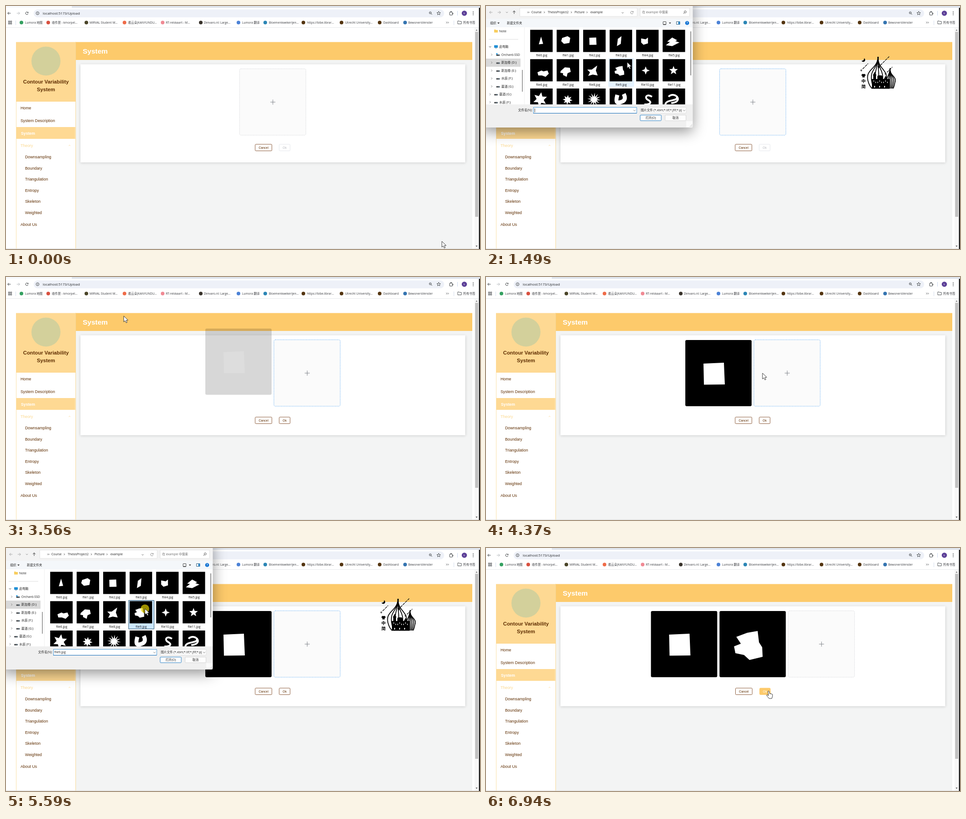
Write an HTML page with a canvas that moves like this. It is 1044 by 536 pixels and loops after 8000 ms.

```html
<!DOCTYPE html>
<html lang="en">
<head>
<meta charset="utf-8">
<title>Upload</title>
<style>
html, body { margin: 0; width: 100%; height: 100%; overflow: hidden; background: #fff; }
canvas { display: block; width: 1044px; height: 536px; }
</style>
</head>
<body>
<canvas id="stage" width="1044" height="536"></canvas>
<script>
const g = document.getElementById('stage').getContext('2d');
const LOOP = 8000;
const UI = '"Open Sans", "Noto Sans CJK SC", "Noto Sans CJK", sans-serif';
const PAGE = '"Liberation Sans", Arial, sans-serif';
const BROWN = '#5e2d00', GOLD = '#fdca6b', PALE = '#fed993', BLUE = '#409eff';

// Dialog visible spans, and when each picked picture lands on the page
const OPEN = [[940, 3380], [4640, 5800]];
const ADD = [3430, 5870];
const PICK = [[2250, 2], [5420, 9]];
const CLICKS = [[740, 830], [2250, 2350], [3220, 3300], [4430, 4520], [5540, 5640]];
const PATH = [
  [70, 960, 519], [660, 600, 225], [900, 596, 222], [1490, 311, 124], [1660, 309, 122],
  [2200, 251, 83], [3480, 251, 83], [4370, 609, 212], [4540, 606, 216], [4700, 540, 228],
  [5350, 306, 134], [5660, 306, 134], [5920, 325, 157], [6000, 372, 200], [6180, 540, 330],
  [6300, 610, 364], [6470, 640, 314], [6670, 640, 314], [6800, 620, 316]
];

const clamp = v => Math.max(0, Math.min(1, v));
const within = (t, [a, b]) => t >= a && t < b;

// cubic-bezier(.55, 0, .1, 1)
function glide(p) {
  p = clamp(p);
  let lo = 0, hi = 1;
  for (let i = 0; i < 18; i++) {
    const s = (lo + hi) / 2, r = 1 - s;
    if (1.65 * s * r * r + 0.3 * s * s * r + s * s * s < p) lo = s; else hi = s;
  }
  return 3 * lo * lo * (1 - lo) + lo * lo * lo;
}

function cursorAt(t) {
  let a = PATH[0];
  for (const b of PATH) {
    if (t < b[0]) {
      const p = clamp((t - a[0]) / (b[0] - a[0] || 1)), e = p * p * (3 - 2 * p);
      return [a[1] + (b[1] - a[1]) * e, a[2] + (b[2] - a[2]) * e];
    }
    a = b;
  }
  return [a[1], a[2]];
}

function rect(x, y, w, h, fill, stroke, r = 0, lw = 1) {
  g.beginPath();
  g.roundRect(x, y, w, h, r);
  if (fill) { g.fillStyle = fill; g.fill(); }
  if (stroke) { g.strokeStyle = stroke; g.lineWidth = lw; g.stroke(); }
}
function disc(x, y, r, fill, stroke, lw = 1) {
  g.beginPath();
  g.arc(x, y, r, 0, 7);
  if (fill) { g.fillStyle = fill; g.fill(); }
  if (stroke) { g.strokeStyle = stroke; g.lineWidth = lw; g.stroke(); }
}
function trace(pts, x = 0, y = 0, k = 1) {
  g.beginPath();
  for (let i = 0; i < pts.length; i += 2) g.lineTo(x + pts[i] * k, y + pts[i + 1] * k);
}
function line(pts, color, lw = 1) {
  trace(pts);
  g.strokeStyle = color; g.lineWidth = lw; g.stroke();
}
function poly(pts, fill, x, y, k) {
  trace(pts, x, y, k);
  g.closePath(); g.fillStyle = fill; g.fill();
}
// y is the middle of the capitals
function text(s, x, y, size, color, { font = UI, weight = 400, align = 'left' } = {}) {
  g.font = `${weight} ${size}px ${font}`;
  g.textAlign = align;
  g.fillStyle = color;
  g.fillText(s, x, y + size * 0.36);
}
function clipped(x, y, w, h, draw) {
  g.save();
  g.beginPath(); g.rect(x, y, w, h); g.clip();
  draw();
  g.restore();
}
function chevron(x, y, dir, color, s = 2.2) {
  const p = { down: [-s, -s / 2, 0, s / 2, s, -s / 2], up: [-s, s / 2, 0, -s / 2, s, s / 2], right: [-s / 2, -s, s / 2, 0, -s / 2, s] }[dir];
  line(p.map((v, i) => v + (i % 2 ? y : x)), color, 0.9);
}
function arrow(x, y, angle, color) {
  g.save();
  g.translate(x, y); g.rotate(angle);
  line([-3.3, 0, 3.3, 0], color, 1);
  line([0.3, -3, 3.3, 0, 0.3, 3], color, 1);
  g.restore();
}
function reload(x, y, color) {
  g.beginPath(); g.arc(x, y, 2.9, 0.4, 5.5);
  g.strokeStyle = color; g.lineWidth = 1; g.stroke();
  poly([3.3, -3.6, 3.3, -0.4, 0.4, -0.4], color, x, y);
}
function lens(x, y, flip, color) {
  disc(x, y, 2.3, null, color, 0.9);
  line([x + 1.7 * flip, y + 1.7, x + 4 * flip, y + 4], color, 1);
}
function star(x, y, n, r, inner, turn = 0) {
  const pts = [];
  for (let i = 0; i < n * 2; i++) {
    const a = turn - Math.PI / 2 + i * Math.PI / n, q = i % 2 ? inner : r;
    pts.push(x + Math.cos(a) * q, y + Math.sin(a) * q);
  }
  return pts;
}
function folder(x, y, fill, stroke) {
  trace([0, 0, 3, 0, 4, 1, 8, 1, 8, 6.5, 0, 6.5], x, y);
  g.closePath();
  if (fill) { g.fillStyle = fill; g.fill(); }
  if (stroke) { g.strokeStyle = stroke; g.lineWidth = 0.9; g.stroke(); }
}

const SQUARE = [40, 52, 85, 50, 87, 98, 41, 98.5];
const ROCK = [37, 57, 61, 48, 84, 44, 87, 69, 94, 80, 95, 101, 66, 108, 54, 97, 35, 93, 32, 78, 47, 72];
const SHAPES = [
  [24, 15, 19, 32, 28.5, 31],
  [12, 18, 24, 14, 30, 18, 28, 29, 16, 31, 10, 25],
  SQUARE.map(v => v / 2.96),
  [18, 20, 26, 14, 24.5, 31, 16, 36],
  [11, 19, 21, 21, 26, 17, 26, 30, 16, 33, 11, 28],
  [21, 17, 32, 23, 28, 25, 37, 28, 21, 36, 7, 34, 16, 27, 10, 26],
  [16, 29, 25, 25, 29, 27, 38, 25, 41, 32, 34, 39, 26, 36, 18, 36],
  [9, 26, 18, 18, 29, 19, 31, 28, 24, 31, 22, 39, 14, 35, 14, 31, 8, 30],
  [9, 23, 19, 23, 31, 14, 28, 25, 32, 36, 21, 34, 11, 37, 15, 29],
  ROCK.map(v => v / 2.96),
  star(21, 25, 4, 9, 3.6),
  star(24, 25, 5, 10, 4.3),
  star(22, 24, 6, 16, 8, 0.15),
  star(24, 25, 8, 11, 5.5, 0.1),
  star(24, 24, 12, 15, 6, 0.1)
];

function squiggle(kind, x, y) {
  g.save();
  g.translate(x, y);
  g.strokeStyle = '#fff'; g.lineWidth = kind ? 4 : 9;
  g.beginPath();
  if (kind === 0) { g.moveTo(17, 14); g.bezierCurveTo(12, 32, 17, 32, 24, 30); g.bezierCurveTo(33, 28, 36, 22, 31, 12); }
  if (kind === 1) { g.moveTo(35, 18); g.bezierCurveTo(22, 10, 18, 21, 26, 25); g.bezierCurveTo(36, 30, 31, 36, 18, 35); }
  if (kind === 2) { g.moveTo(13, 18); g.bezierCurveTo(20, 11, 34, 14, 31, 22); g.bezierCurveTo(27, 28, 4, 24, 6, 38); g.moveTo(31, 17); g.bezierCurveTo(38, 26, 30, 31, 19, 32); }
  g.stroke();
  g.restore();
}

function drawBrowser() {
  rect(0, 0, 1044, 4, '#dfe4ec');
  rect(0, 0, 145, 4, '#f8fafd');
  rect(61, 7.5, 904, 17.5, '#eef1f8', null, 9);
  const ink = '#3c4043';
  arrow(7, 16, Math.PI, ink);
  arrow(27, 16, 0, '#b5b8bc');
  reload(46, 16, ink);
  disc(69.5, 16, 3.3, null, ink, 0.9);
  line([69.5, 15.5, 69.5, 18], ink, 0.9);
  rect(69, 13.8, 1, 1, ink);
  text('localhost:5173/Upload', 81, 16, 7.8, '#26282b');
  lens(934.5, 15, 1, ink);
  line([933.3, 15, 935.7, 15], ink, 0.7);
  trace(star(953, 16, 5, 4.3, 1.9)); g.closePath();
  g.strokeStyle = ink; g.lineWidth = 0.9; g.stroke();
  rect(977, 13.5, 6.5, 6.5, null, ink, 1);
  disc(980.3, 12.6, 1.2, ink); disc(984, 16.7, 1.2, ink);
  line([994.5, 11, 994.5, 21], '#c9d6ee');
  disc(1009.5, 16, 5.8, '#5c3f97');
  text('k', 1009.5, 16, 5.5, '#fff', { align: 'center' });
  for (const d of [-3.3, 0, 3.3]) disc(1029, 16 + d, 0.9, ink);

  for (let i = 0; i < 4; i++) rect(5.5 + (i % 2) * 4.3, 33 + (i >> 1) * 4.3, 2.7, 2.7, null, ink, 0, 0.9);
  line([21.5, 32, 21.5, 42], '#d5deee');
  const marks = [
    [34, '#34a060', 'Lumora 地图', 42], [93, '#d8503f', '收件匣 - kmorpel...', 101],
    [177, '#4a4528', 'MIRVAL Student M...', 184], [261, '#ef6b48', '看云朵(KANYUNDU...', 269],
    [345, '#f08a94', 'RT-reiskaart - M...', 352], [429, '#38322b', 'Zenvaro.nl: Large...', 436],
    [512, '#4b82d6', 'Lumora 翻译', 520], [571, '#2b86b5', 'Bloemenkwekerijen...', 579],
    [655, '#54350f', 'https://bibe.librar...', 663], [739, '#54350f', 'Utrecht University...', 747],
    [823, '#54350f', 'Dashboard', 831], [879, '#3474b0', 'BewonersVenster', 886]
  ];
  for (const [x, c, s, tx] of marks) {
    disc(x, 36.5, 4, c);
    text(s, tx, 37, 6.6, '#3a3c40');
  }
  chevron(970.5, 36.5, 'right', ink, 1.8); chevron(973.8, 36.5, 'right', ink, 1.8);
  line([986.5, 32, 986.5, 42], '#d5deee');
  folder(995, 33, null, ink);
  text('所有书签', 1007, 37, 6.7, '#3a3c40');
  line([0, 47.5, 1041, 47.5], '#e6e8eb');

  rect(1032, 48, 9.5, 488, '#f7f7f7');
  rect(1033.3, 57, 6.7, 408, '#c1c1c1');
  poly([1034.5, 54.5, 1038.5, 54.5, 1036.5, 51.5], '#777', 0, 0);
  poly([1034.5, 528.5, 1038.5, 528.5, 1036.5, 531.5], '#555', 0, 0);
  rect(1041.7, 4, 2.3, 532, '#111');
}

function drawSidebar() {
  rect(22, 79.5, 132, 131.5, PALE);
  disc(88, 121.5, 32, '#d3d09b');
  const bold = { font: PAGE, weight: 700, align: 'center' };
  text('Contour Variability', 88, 167, 11.3, BROWN, bold);
  text('System', 88, 184, 11.3, BROWN, bold);
  line([22.5, 211, 22.5, 536], '#fbe0a8');
  line([153.5, 79, 153.5, 536], '#f6d795');
  rect(23, 267, 129.5, 26, PALE);
  const item = (s, x, y, c = BROWN) => text(s, x, y, 8.8, c, { font: PAGE });
  item('Home', 32, 225);
  item('System Description', 32, 252.5);
  text('System', 33, 280.5, 8.7, '#fff', { font: PAGE, weight: 700 });
  item('Theory', 32, 307.5, '#fbd88f');
  chevron(140, 307.5, 'up', '#fbd88f', 1.8);
  ['Downsampling', 'Boundary', 'Triangulation', 'Entropy', 'Skeleton', 'Weighted']
    .forEach((s, i) => item(s, 42, 333 + i * 24.5));
  item('About Us', 32, 482);
}

function picture(shape, x, y, alpha) {
  g.save();
  g.globalAlpha = alpha;
  rect(x, y, 146, 146, '#000', null, 3);
  poly(shape, '#fff', x, y);
  g.restore();
}

function button(s, x, y, w, color, edge, fill) {
  rect(x + 0.5, y + 0.5, w - 1, 14.5, fill, edge, 1.8, 0.9);
  text(s, x + w / 2, y + 7.8, 6.9, color, { font: PAGE, align: 'center' });
}

function drawPage(t) {
  rect(154, 119, 873, 417, '#f3f4f4');
  rect(154, 79.5, 873, 39.5, GOLD);
  text('System', 169, 99, 15.5, '#fff', { font: PAGE, weight: 700 });

  const count = ADD.filter(a => t >= a).length;
  g.save();
  g.shadowColor = 'rgba(0,0,0,.16)'; g.shadowBlur = 6; g.shadowOffsetY = 1;
  rect(164, 128.5, 847.5, count ? 220.5 : 216.5, '#fff');
  g.restore();

  const dx = 514 + count * 75.6;
  g.save();
  g.setLineDash([2, 1.4]);
  rect(dx + 0.5, 138.5, 146, 146.5, '#fbfbfb', within(t, [600, 6740]) ? '#62adf3' : '#d4d5d8', 3, 0.9);
  g.restore();
  line([dx + 68.3, 212, dx + 79.3, 212], '#70757c', 0.9);
  line([dx + 73.8, 206.5, dx + 73.8, 217.5], '#70757c', 0.9);

  if (count) {
    const p = glide((t - ADD[0]) / 500), q = glide((t - ADD[1]) / 500);
    picture(SQUARE, 439 - 75.7 * q, 139 - 30 * (1 - p), p);
    if (count > 1) picture(ROCK, 514.3, 139 - 30 * (1 - q), q);
  }

  const by = count ? 308.5 : 304.5, hot = t >= 6800, sx = hot ? 0.7 : 0;
  button('Cancel', 548.3 + sx, by, 37.8, BROWN, '#804a26', '#fff');
  if (hot) button('Ok', 601.5 + sx, by, 24.5, '#fff', GOLD, GOLD);
  else if (count) button('Ok', 601.2, by, 25, BROWN, '#804a26', '#fff');
  else button('Ok', 601.2, by, 25, '#b9bbc0', '#e3e5ea', '#fff');
  line([0, 535.5, 1041, 535.5], '#dcdcdc');
}

function drive(x, y) {
  rect(x, y - 0.5, 8, 3, '#4a4d50', null, 1);
  rect(x + 5.5, y + 0.5, 1.3, 1, '#7fd0ff');
}

function drawNav() {
  const ink = '#222';
  folder(18, 52, '#f8cd5c');
  text('Note', 29, 55.5, 7, ink);
  line([6, 73.5, 71, 73.5], '#dedede');
  chevron(9, 90, 'down', '#333');
  rect(18, 86.5, 8, 5.5, '#1f8fd6'); rect(20, 92.5, 4, 1, '#5c7a90');
  text('此电脑', 29, 90, 6.8, ink);
  rect(0, 116, 76, 18, '#d9d9d9');
  const drives = [[0, 'Orchard-SSD'], [0, '新加卷 (D:)'], [0, '新加卷 (E:)'], [0, '水辰 (F:)'], [0, '墓酒 (G:)'], [1, '墓酒 (G:)'], [1, '水辰 (F:)']];
  drives.forEach(([root, s], i) => {
    const y = 107.5 + i * 17.45, x = root ? 18 : 22.5;
    chevron(root ? 9 : 12.5, y, 'right', '#777');
    drive(x, y);
    if (!i) rect(x, y - 3.5, 3, 3, '#2b9be0');
    clipped(0, 98, 75, 119, () => text(s, x + 11.3, y, 6.9, ink));
  });
  rect(79.3, 141, 1.6, 48, '#8a8a8a');
}

function drawTiles(picked, [mx, my]) {
  for (let i = 0; i < 18; i++) {
    const x = 97.3 + (i % 6) * 58.35, y = 52.5 + Math.floor(i / 6) * 64.8;
    const over = mx > x - 3 && mx < x + 54 && my > y - 2 && my < y + 61;
    if (i === picked) rect(x - 2.3, y - 1.7, 56, 63, '#cce8ff', '#24506e', 0, 1);
    else if (over) rect(x - 3, y - 2, 57, 63, '#e5f3ff');
    rect(x, y, 49.5, 49, '#000');
    if (i < SHAPES.length) poly(SHAPES[i], '#fff', x, y);
    else squiggle(i - 15, x, y);
    text(`file${i}.jpg`, x + 25.3, y + 56, 6.7, '#111', { align: 'center' });
  }
}

function drawDialog(picked, mouse) {
  g.save();
  g.shadowColor = 'rgba(0,0,0,.42)'; g.shadowBlur = 30; g.shadowOffsetY = 9;
  rect(-8, -20, 463.5, 288, '#f0f0f0', null, 4);
  g.restore();
  rect(0, 0, 455, 28, '#f3f3f3');
  rect(0, 28, 455, 19, '#f4f7fa');
  rect(0, 47, 455, 170, '#fff');
  line([84.5, 47, 84.5, 217], '#f0f0f0');

  const ink = '#222';
  arrow(11, 14, Math.PI, '#a9a9a9');
  arrow(29, 14, 0, '#a9a9a9');
  chevron(46, 14, 'down', '#888');
  arrow(62, 14, -Math.PI / 2, '#333');
  rect(74.5, 4.5, 258.5, 18.5, '#fff', '#e2e2e2');
  chevron(92, 14, 'right', '#555', 1.5); chevron(94.5, 14, 'right', '#555', 1.5);
  for (const [s, x] of [['Course', 100], ['ThesisProject2', 136], ['Picture', 195], ['example', 230]]) text(s, x, 14, 6.8, ink);
  for (const x of [128.5, 188, 222.5]) chevron(x, 14, 'right', '#444', 1.8);
  chevron(301, 15, 'down', '#666');
  reload(321.5, 14.5, '#888');
  rect(339.5, 4.5, 109, 18.5, '#fff', '#e2e2e2');
  text('在 example 中搜索', 344, 14, 6.7, '#666');
  lens(438.8, 13, -1, '#444');

  text('组织', 9, 38, 6.8, ink);
  poly([25, 36.5, 30, 36.5, 27.5, 39.3], ink, 0, 0);
  text('新建文件夹', 46, 38, 6.7, ink);
  rect(390, 34.5, 6.5, 6, null, '#333', 0.5, 0.9);
  line([390, 41, 396.5, 41], '#333', 1.3);
  poly([403, 36.5, 407.5, 36.5, 405.2, 39.3], ink, 0, 0);
  rect(419.5, 34.5, 7.5, 6, '#fff', '#24506e', 0, 0.9);
  rect(423.5, 34.5, 3.5, 6, '#2b87c8');
  disc(443, 37.5, 4.3, '#0a6ed1');
  text('?', 443, 37.5, 6.3, '#fff', { align: 'center', weight: 700 });

  clipped(0, 47, 84, 170, drawNav);
  clipped(85, 47, 364, 170, () => drawTiles(picked, mouse));
  rect(450.3, 56, 1.6, 97, '#777');

  rect(441, 254, 14, 13.5, '#fafafa');
  for (let i = 0; i < 6; i++) rect(453 - [0, 2, 4, 0, 2, 0][i], 265 - [0, 0, 0, 2, 2, 4][i], 1, 1, '#b5b5b5');
  text('文件名(N):', 102, 230, 6.8, ink, { align: 'right' });
  rect(104.5, 223.5, 227.5, 13, '#fff', '#4a9bd8');
  line([104, 236.5, 332, 236.5], '#0a67b5');
  if (picked < 0) line([107.5, 226, 107.5, 234.5], '#111', 0.8);
  else text(`file${picked}.jpg`, 106.5, 230, 6.8, ink);
  chevron(327, 230.5, 'down', '#666');
  rect(339.5, 223.5, 101.5, 13, '#fbfbfb', '#e0e0e0');
  clipped(339, 223, 92, 14, () => text('图片文件 (*.xbm;*.tif;*.jfif;*.pjpeg)', 341, 230, 6.6, ink));
  chevron(436.5, 230.5, 'down', '#666');
  rect(339.5, 240.5, 46.5, 12.5, '#fdfdfd', '#2a80c4', 1.5);
  text('打开(O)', 362.7, 246.7, 6.7, ink, { align: 'center' });
  rect(394.5, 240.5, 46, 12.5, '#fdfdfd', '#d5d5d5', 1.5);
  text('取消', 417.5, 246.7, 6.7, ink, { align: 'center' });
}

// Onion dome built from a fan of ribs
function dome(x, tip, base, w, from, to) {
  for (let i = 0; i <= 5; i++) {
    const k = from + (to - from) * i / 5;
    g.beginPath();
    g.moveTo(x, tip);
    g.bezierCurveTo(x - 1, tip + (base - tip) * 0.42, x + k * w * 1.5, tip + (base - tip) * 0.38, x + k * w, base - 13);
    g.quadraticCurveTo(x + k * w * 0.85, base - 4, x + k * w * 0.62, base);
    g.strokeStyle = '#000'; g.lineWidth = 1.8; g.stroke();
  }
}

function drawBadge() {
  dome(863.5, 112, 182, 20, -1.05, 0.85);
  dome(890, 137, 182, 10.5, -0.6, 1);
  rect(850, 161, 39, 21.5, '#000');
  rect(862, 153, 11, 12, '#000', null, 3);
  rect(853, 153, 6, 10, '#000');
  poly([852, 153, 856, 145, 860, 153], '#000', 0, 0);
  poly([876, 162, 880, 154, 884, 162], '#000', 0, 0);
  for (let i = 0; i < 8; i++) rect(853.5 + i * 4.3, i % 3 ? 167 : 164, 1.2, 3, '#fff');
  for (const x of [855, 866, 877]) rect(x, 176, 2, 4, '#fff', null, 1);
  const spark = (x, y, r, len) => {
    poly(star(x, y, 4, r, r * 0.25), '#000', 0, 0);
    g.setLineDash([6, 1.5]);
    line([x + 3, y - 3, x + len, y - len], '#000', 1.2);
    g.setLineDash([]);
  };
  spark(865.5, 134, 4.5, 22.5);
  spark(826.5, 142, 3.5, 15);
  spark(880, 149.5, 3.5, 15);
  g.beginPath();
  g.arc(831, 119, 4.2, -1.1, 2.7);
  g.quadraticCurveTo(832.5, 121, 832.9, 115.3);
  g.fillStyle = '#000'; g.fill();
  poly([-2, -4, 0, -3, 2, -4, 5, -1, 3, 1, 2.5, 0.5, 2.5, 4, -2.5, 4, -2.5, 0.5, -3, 1, -5, -1], '#000', 831.5, 153.5);
  text('中', 831.5, 166, 9.5, '#000', { align: 'center', weight: 700 });
  text('简', 831.5, 178, 9.5, '#000', { align: 'center', weight: 700 });
}

function drawCursor(t, [x, y]) {
  if (CLICKS.some(c => within(t, c))) {
    g.save();
    g.globalAlpha = 0.65;
    disc(x, y, 9.5, '#f0dc00');
    g.restore();
  }
  if (t >= 6800) {
    trace([3, 1, 5, 0.5, 6, 1.5, 7, 6.5, 10, 6.5, 13, 8, 13, 12, 11.5, 17, 5.5, 17, 1, 11.5, 0, 9.5, 1.5, 8.8, 4.3, 10.5], x - 2, y - 1);
  } else {
    trace([0, 0, 0, 13, 3, 10.3, 5.3, 15, 7.5, 14, 5.4, 9.5, 9.4, 9.2], x, y);
  }
  g.closePath();
  g.lineJoin = 'round';
  g.fillStyle = '#fff'; g.fill();
  g.strokeStyle = '#222'; g.lineWidth = 0.9; g.stroke();
  g.lineJoin = 'miter';
}

function draw(t) {
  const mouse = cursorAt(t);
  g.clearRect(0, 0, 1044, 536);
  rect(0, 0, 1044, 536, '#fff');
  drawBrowser();
  drawSidebar();
  drawPage(t);
  const i = OPEN.findIndex(span => within(t, span));
  if (i >= 0) {
    const [from, to] = OPEN[i], [when, file] = PICK[i];
    g.save();
    g.globalAlpha = clamp(Math.min((t - from) / 100, (to - t) / 80));
    drawDialog(t >= when ? file : -1, mouse);
    g.restore();
    if (t > from + 140) drawBadge();
  }
  drawCursor(t, mouse);
}

const start = performance.now();
function tick() {
  draw((performance.now() - start) % LOOP);
  requestAnimationFrame(tick);
}
tick();
</script>
</body>
</html>
```
